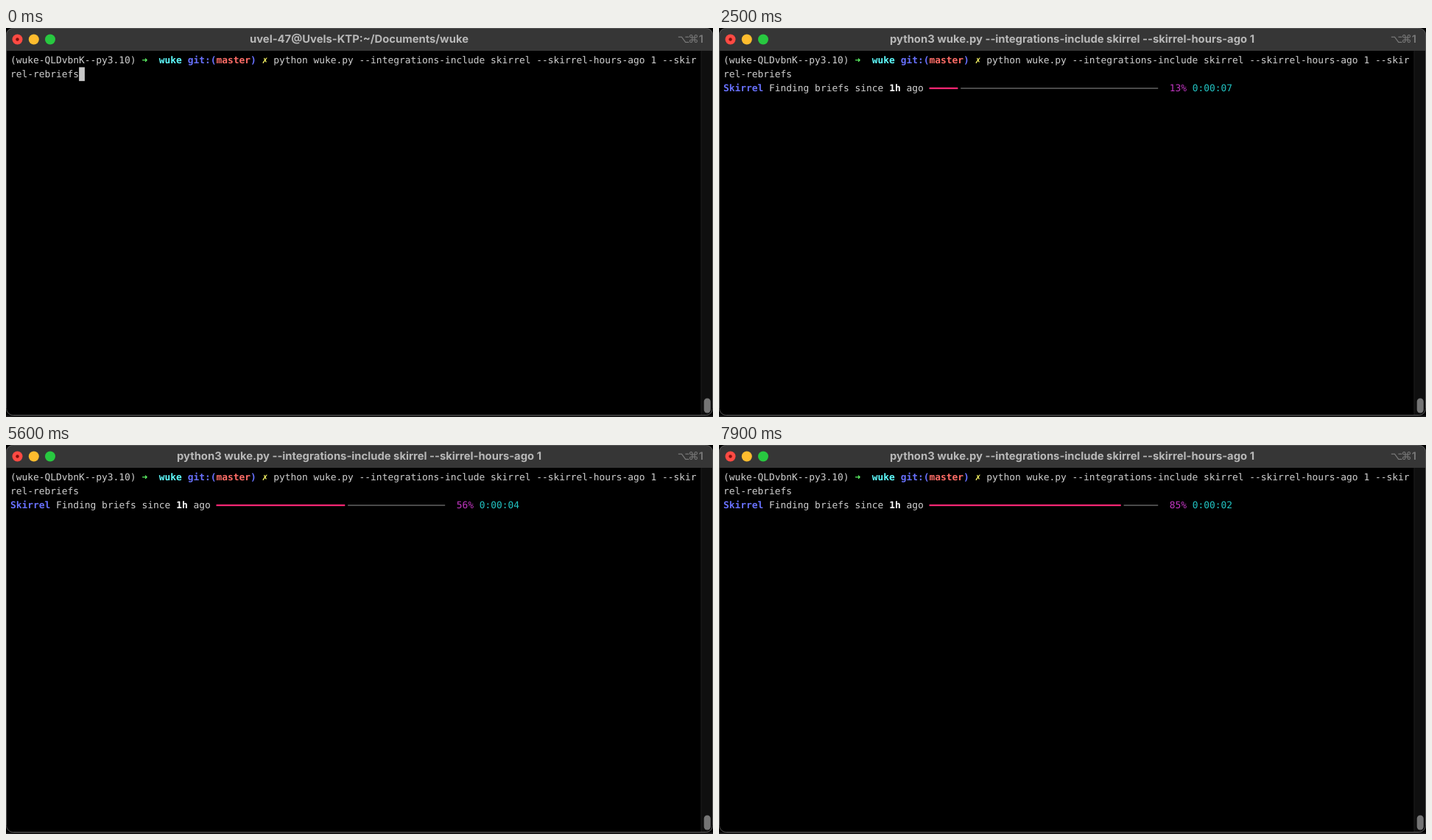
An HTML page that plays this animation: 960 by 529 pixels, repeating every 8000 ms.

```html
<!DOCTYPE html>
<html lang="en">
<head>
<meta charset="utf-8">
<title>Terminal progress</title>
<style>
  html, body { margin: 0; width: 100%; height: 100%; overflow: hidden; background: #000; }
  svg { display: block; width: 100vw; height: 100vh; }
  text { white-space: pre; text-rendering: geometricPrecision; }
  .mono { font: 12.9px "DejaVu Sans Mono", monospace; }
  .bold { font-weight: 700; }
  .title { font: 700 14.8px Inter, sans-serif; fill: #b8b8b8; text-anchor: middle; }
  .key { font: 14.5px "DejaVu Sans", sans-serif; fill: #7a7a7a; text-anchor: middle; }
  .digit { font: 600 14.5px Inter, sans-serif; }
</style>
</head>
<body>
<svg id="stage" viewBox="0 0 960 529" xmlns="http://www.w3.org/2000/svg">
  <defs>
    <clipPath id="frame"><rect width="960" height="527" rx="9"/></clipPath>
  </defs>
  <rect width="960" height="529" fill="#000"/>
  <rect y="527" width="960" height="2" fill="#1a1a1a"/>
  <g clip-path="url(#frame)">
    <rect width="960" height="527" fill="#000"/>
    <rect width="960" height="31" fill="#363636"/>
    <rect x="943.5" y="31" width="16" height="496" fill="#0f0f0f"/>
    <rect x="943.5" y="31" width="1" height="496" fill="#1d1d1d"/>
  </g>
  <rect x="947.7" y="503.5" width="9" height="20" rx="4.5" fill="#757575"/>
  <rect x=".5" y=".5" width="959" height="526" rx="9" fill="none" stroke="#555"/>
  <circle cx="15.5" cy="15.5" r="7" fill="#fe4a43"/>
  <circle cx="15.5" cy="15.5" r="2.2" fill="#80100c"/>
  <circle cx="37.8" cy="15.5" r="7" fill="#febc2e"/>
  <circle cx="60" cy="15.5" r="7" fill="#28c840"/>
  <text id="title" class="title" x="479.5" y="20.3"></text>
  <text class="key" x="920" y="19.5">⌥</text>
  <text class="key" x="933.5" y="19.5">⌘</text>
  <text class="key digit" x="943.8" y="19.5">1</text>
  <g id="screen"></g>
  <g id="progress">
    <rect id="rest" y="81" height="2" fill="#4a4a4a"/>
    <rect id="done" y="80.8" height="2.3" fill="#f92672"/>
  </g>
  <rect id="cursor" width="7.8" height="18.8" fill="#c7c7c7"/>
</svg>
<script>
const LOOP = 8000, LEFT = 5.9, CELL = 7.767, ROW = 18.75, TOP = 35, BASELINE = 13.4;
const BAR_COL = 36, BAR_CELLS = 40, TOTAL = 39;
const ENTER = 900, RETITLE = 1000, START = 1500;

const GREY = '#d0d0d0', WHITE = '#fff', GREEN = '#5ff967', CYAN = '#5ffdff';
const BLUE = '#6871ff', RED = '#ff6d67', YELLOW = '#fefb67';
const MAGENTA = '#c236c2', TEAL = '#22c4c3';

const IDLE_TITLE = 'uvel-47@Uvels-KTP:~/Documents/wuke';
const RUN_TITLE = 'python3 wuke.py --integrations-include skirrel --skirrel-hours-ago 1';

// time at which each item finishes
const ticks = [
  1700, 1900, 2100, 2300, 2500, 2700, 2900, 3000, 3200, 3300, 3500,
  3800, 4000, 4100, 4400, 4600, 4600, 4800, 5100, 5300, 5400, 5600,
  5800, 5900, 6100, 6300, 6600, 6700, 7100, 7200, 7400, 7600, 7900
];
// remaining seconds count down from 8 at these times
const etaTicks = [1900, 2300, 2900, 3500, 4800, 5800, 6700];

const $ = id => document.getElementById(id);
const colX = col => LEFT + col * CELL;
const passed = (list, t) => list.filter(v => v <= t).length;

function put(parent, row, col, str, fill, bold) {
  const el = document.createElementNS('http://www.w3.org/2000/svg', 'text');
  el.setAttribute('class', bold ? 'mono bold' : 'mono');
  el.setAttribute('x', colX(col));
  el.setAttribute('y', TOP + row * ROW + BASELINE);
  el.setAttribute('fill', fill);
  el.textContent = str;
  parent.appendChild(el);
  return el;
}

function setText(el, str) {
  if (el.textContent !== str) el.textContent = str;
}

function setSpan(el, from, to) {
  el.setAttribute('x', from);
  el.setAttribute('width', Math.max(0, to - from));
}

const screen = $('screen'), progress = $('progress');

put(screen, 0, 0, '(wuke-QLDvbnK--py3.10)', GREY);
put(screen, 0, 23, '➜', GREEN, true);
put(screen, 0, 26, 'wuke', CYAN, true);
put(screen, 0, 31, 'git:(', BLUE, true);
put(screen, 0, 36, 'master', RED, true);
put(screen, 0, 42, ')', BLUE, true);
put(screen, 0, 44, '✗', YELLOW, true);
put(screen, 0, 46, 'python wuke.py --integrations-include skirrel --skirrel-hours-ago 1 --skir', GREY);
put(screen, 1, 0, 'rel-rebriefs', GREY);

put(progress, 2, 0, 'Skirrel', BLUE, true);
put(progress, 2, 8, 'Finding briefs since', GREY);
put(progress, 2, 29, '1h', WHITE, true);
put(progress, 2, 32, 'ago', GREY);
const percent = put(progress, 2, 77, '', MAGENTA);
const eta = put(progress, 2, 82, '', TEAL);

function drawProgress(t) {
  const count = passed(ticks, t);
  const left = colX(BAR_COL), right = colX(BAR_COL + BAR_CELLS);
  const halves = Math.floor(BAR_CELLS * 2 * count / TOTAL);
  const half = CELL / 2;
  setSpan($('done'), left, left + halves * half);
  setSpan($('rest'), halves ? left + (halves + 1) * half : left, right);
  setText(percent, (Math.round(100 * count / TOTAL) + '%').padStart(4));
  const steps = passed(etaTicks, t);
  setText(eta, steps ? '0:00:0' + (9 - steps) : '-:--:--');
}

function draw(t) {
  const entered = t >= ENTER, running = t >= START;
  setText($('title'), t < RETITLE ? IDLE_TITLE : RUN_TITLE);
  $('cursor').setAttribute('x', colX(entered ? 0 : 12));
  $('cursor').setAttribute('y', TOP + (entered ? 2 : 1) * ROW - .4);
  $('cursor').style.display = running ? 'none' : '';
  progress.style.display = running ? '' : 'none';
  if (running) drawProgress(t);
}

const begin = performance.now();
function frame() {
  draw((performance.now() - begin) % LOOP);
  requestAnimationFrame(frame);
}
draw(0);
requestAnimationFrame(frame);
</script>
</body>
</html>
```
